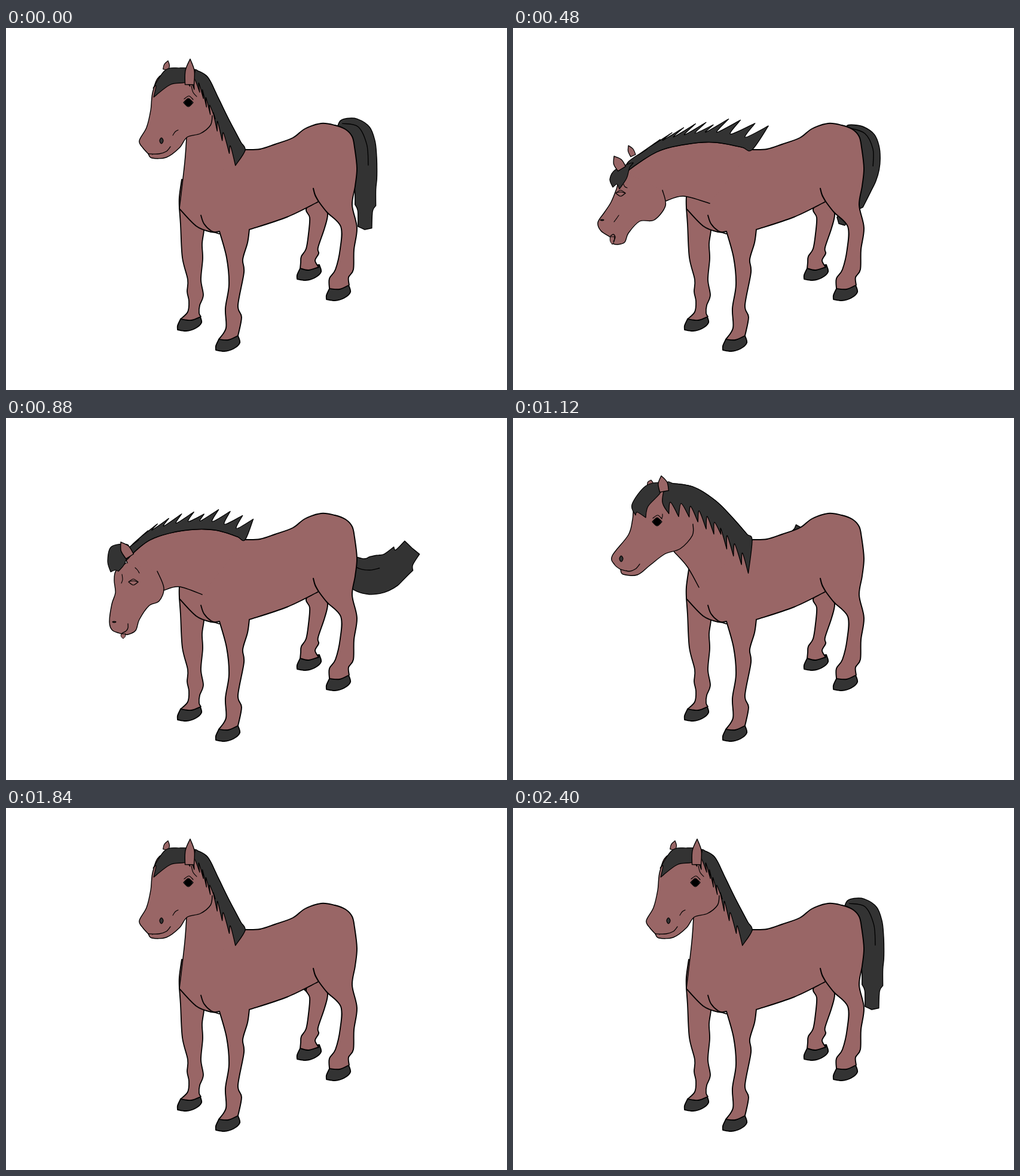
An HTML page for the animation above (2.48 s loop, 838 px wide and 607 px high).

```html
<!DOCTYPE html>
<html lang="en">
<head>
<meta charset="utf-8">
<title>Horse</title>
<style>
html, body { margin: 0; width: 100%; height: 100%; overflow: hidden; background: #fff; }
svg { display: block; width: 838px; height: 607px; }
path { stroke: #000; stroke-linejoin: round; stroke-linecap: round; }
</style>
</head>
<body>
<svg id="stage" viewBox="0 0 838 607"></svg>
<script>
const LOOP = 2480, STEP = 80;
const BROWN = '#996666', DARK = '#333333';
const stage = document.getElementById('stage');

const pt = (x, y, c = false) => ({ x, y, c });
const add = (a, b, k = 1, c = false) => pt(a.x + b.x * k, a.y + b.y * k, c);
const mix = (a, b, u) => a + (b - a) * u;
const mixPts = (a, b, u) => a.map((p, i) =>
  pt(mix(p.x, b[i].x, u), mix(p.y, b[i].y, u), p.c || b[i].c));
const rnd = i => { const v = Math.sin(i * 12.9898 + 4) * 43758.5453; return v - Math.floor(v); };

// Points are "x,y"; a trailing ! makes a sharp corner.
const parse = s => s.trim().split(/\s+/).map(p => {
  const [x, y] = p.split(',').map(parseFloat);
  return pt(x, y, p.endsWith('!'));
});

// Smooth path through the points
function curve(pts, closed) {
  const n = pts.length, r = v => v.toFixed(1);
  const at = i => closed ? pts[(i + n) % n] : pts[Math.max(0, Math.min(n - 1, i))];
  let d = `M${r(pts[0].x)} ${r(pts[0].y)}`;
  for (let i = 0; i < (closed ? n : n - 1); i++) {
    const a = at(i), b = at(i + 1);
    const p = a.c ? a : at(i - 1), q = b.c ? b : at(i + 2);
    d += `C${r(a.x + (b.x - p.x) / 6)} ${r(a.y + (b.y - p.y) / 6)} ` +
         `${r(b.x - (q.x - a.x) / 6)} ${r(b.y - (q.y - a.y) / 6)} ${r(b.x)} ${r(b.y)}`;
  }
  return closed ? d + 'Z' : d;
}

// Position at s (0..1) on the smooth line through the points
function along(pts, s) {
  const m = pts.length - 1, f = Math.max(0, Math.min(1, s)) * m;
  const i = Math.min(m - 1, Math.floor(f)), u = f - i;
  const [a, b, c, d] = [-1, 0, 1, 2].map(k => pts[Math.max(0, Math.min(m, i + k))]);
  const v = k => b[k] + u / 2 * (c[k] - a[k] +
    u * (2 * a[k] - 5 * b[k] + 4 * c[k] - d[k] + u * (3 * (b[k] - c[k]) + d[k] - a[k])));
  return pt(v('x'), v('y'));
}

function direction(a, b) {
  const len = Math.hypot(b.x - a.x, b.y - a.y) || 1;
  return pt((b.x - a.x) / len, (b.y - a.y) / len);
}

function addPath(fill, width) {
  const el = document.createElementNS('http://www.w3.org/2000/svg', 'path');
  el.setAttribute('fill', fill);
  el.setAttribute('stroke-width', width);
  return stage.appendChild(el);
}

const still = (fill, width, closed, pts) =>
  addPath(fill, width).setAttribute('d', curve(pts, closed));

const parts = {};
function part(name, fill, width, closed) {
  parts[name] = { el: addPath(fill, width), closed };
}
const show = (name, pts) => parts[name].el.setAttribute('d', curve(pts, parts[name].closed));

// Tail: a bending spine with a half-width
const tail = (width, spine) => ({ width, spine: parse(spine) });
const rest = tail(21, '557,162 592,176 600,235 601,288 600,338');
const tuck = tail(16, '557,168 592,186 597,235 578,285 545,328');
const swish = [
  [0, tuck],
  [80, tail(18, '557,168 603,188 616,245 600,310 572,354')],
  [160, tail(28, '557,170 598,200 640,235 654,275 614,318')],
  [320, tail(26, '557,174 610,202 655,212 690,209 722,199')],
  [400, tail(32, '560,240 595,263 630,260 658,242 679,218')],
  [480, tail(13, '560,195 562,220 550,250 529,277 499,305')],
  [640, tail(10, '560,195 545,207 525,207 498,197 471,185')],
  [880, tuck]
];

// Head: a few key points for each pose
const heads = {
  up: {
    crest: '316,70! 337,82 354,115 372,152 400,205!',
    throat: '300,140! 302,183! 299,225 290,303',
    head: '318,74 262,78 246,105 242,138 235,167 223,189 229,201 238,211! 244,218 268,217 290,201 303,183 325,177 342,163 345,147',
    lock: '316,70 290,67 266,71 246,101! 251,97 247,116! 275,95 303,90',
    ears: '307,95 308,52 267,70 271,55',
    face: '305,125 260,189',
    mouth: '238,211 256,211 268,207 275,199',
    marks: '310,97 313,108 319,115 279,180 283,174 288,171',
    tongue: '245,212 245,212',
    hair: '-17,7 -12,27', open: 1
  },
  down: {
    crest: '188,242! 240,208 290,195 340,192 400,204!',
    throat: '190,275! 256,290! 285,282 329,294',
    head: '190,243 178,254 173,270 164,292 153,309 142,326 147,340 162,350! 168,362 186,360 193,344 212,324 236,322 255,298 250,272',
    lock: '200,226 172,237 162,253 167,267! 174,262 178,270! 190,252 195,234',
    ears: '182,236 169,215 201,214 193,197',
    face: '180,277 149,322',
    mouth: '163,349 168,346 171,351 168,358',
    marks: '185,262 187,266 191,268 169,325 172,321 177,314',
    tongue: '166,350 166,363',
    hair: '4,-17 29,-34', open: 0
  },
  low: {
    crest: '201,238! 240,205 295,189 350,188 400,204!',
    throat: '215,275! 264,289! 290,283 328,296',
    head: '201,243 184,256 181,272 183,293 177,312 173,342 178,356 194,362! 204,363 217,356 223,338 239,315 256,307 264,285 253,257',
    lock: '203,212 176,216 170,240 175,258! 183,255 188,257! 198,245 204,225',
    ears: '207,232 192,208 203,224 198,214',
    face: '213,275 181,342',
    mouth: '194,361 201,357 204,352 204,345',
    marks: '216,251 220,255 223,260 194,262 195,271 193,277',
    tongue: '196,362 196,370',
    hair: '-2,-14 16,-29', open: 0
  },
  mid: {
    crest: '257,109! 300,115 338,138 368,168 400,205!',
    throat: '245,185! 270,225! 292,250 311,284',
    head: '262,110 222,118 203,150 200,170 193,196 166,231 170,246 180,254! 184,262 208,263 229,247 254,228 280,219 300,197 301,178',
    lock: '250,109 222,114 199,145 205,163! 208,158 222,167! 226,148 246,126',
    ears: '253,123 248,97 229,113 231,104',
    face: '241,174 181,236',
    mouth: '180,254 194,257 205,253 212,245',
    marks: '250,161 250,165 249,168 181,235 181,236 182,236',
    tongue: '190,256 190,256',
    hair: '-8,31 -3,52', open: 1
  }
};
for (const h of Object.values(heads))
  for (const k in h) if (k !== 'open') h[k] = parse(h[k]);

const nod = [[0, heads.up], [480, heads.down], [560, heads.down], [880, heads.low],
  [1120, heads.mid], [1360, heads.up], [LOOP, heads.up]];

part('tail', DARK, 1.4, true);
part('strand', 'none', 1.4, false);

// Hooves share one shape; the legs cover their tops.
const hoof = parse('0,0! 32,-6! 35,6 24,16 9,20 -5,18! -5,11');
const hoofAt = (x, y) => still(DARK, 1.8, true, hoof.map(p => pt(p.x + x, p.y + y, p.c)));

hoofAt(492, 403);
hoofAt(292, 488);
still(BROWN, 1.9, false, parse('515,285 502,304 508,318 506,345 502,370 494,383 493,393 492,403! 506,406 523,401! 517,390 523,378 522,368 533,335 538,311 530,290'));
still(BROWN, 1.8, false, parse('290,303 292,330 295,385 304,422 303,442 306,458 304,476 292,488! 310,490 326,484! 323,478 324,465 330,448 326,422 329,387 328,362 331,340 331,325'));

hoofAt(356, 522);
hoofAt(541, 437);
still(BROWN, 1.9, false, parse(`400,204 425,203 450,195 480,184 500,169 527,160 550,163 568,170 579,182 583,200
  587,235 584,265 579,297 587,335 582,372 581,405 573,418 574,431! 558,438 541,437! 541,420 551,405
  559,370 560,333 537,309 523,291! 470,317 407,338! 404,360 396,388 398,410
  388,465 394,485 388,516! 372,523 356,522! 368,503 367,470 373,430 369,385
  357,341! 343,342 318,332 290,303! 290,283 294,254`));
still('none', 2, false, parse('514,269 517,280 523,291'));
still('none', 1.8, false, parse('326,314 331,328 343,340 357,345'));

part('neck', BROWN, 1.5, false);
part('farEar', BROWN, 1.2, true);
part('head', BROWN, 1.4, false);
part('mane', DARK, 1.3, true);
part('lock', DARK, 1.2, true);
part('ear', BROWN, 1.4, true);
part('eye', '#fff', 1.2, true);
part('pupil', '#000', 0.6, true);
part('lid', 'none', 1.2, false);
part('crease', 'none', 1.1, false);
part('cheek', 'none', 1.1, false);
part('nostril', DARK, 1.2, true);
part('tongue', BROWN, 1, true);
part('mouth', 'none', 1.3, false);

function span(keys, t) {
  let i = 0;
  while (i < keys.length - 2 && t >= keys[i + 1][0]) i++;
  const [t0, a] = keys[i], [t1, b] = keys[i + 1];
  return { a, b, u: (t - t0) / (t1 - t0) };
}

// A leaf from base to tip
function leaf(base, tip, half) {
  const d = direction(base, tip), n = pt(-d.y, d.x), m = mixPts([base], [tip], 0.55)[0];
  return [add(base, n, -half, true), add(m, n, -half), pt(tip.x, tip.y, true),
    add(m, n, half), add(base, n, half, true)];
}

const oval = (c, rx, ry, sharp) =>
  [pt(c.x - rx, c.y, sharp), pt(c.x, c.y - ry), pt(c.x + rx, c.y, sharp), pt(c.x, c.y + ry)];

function drawTail(t) {
  let k = { a: rest, b: rest, u: 0 };
  if (t < 480) k = { a: rest, b: tuck, u: t / 480 };
  else if (t < 2400) k = span(swish, (t - 480) % 880);
  const spine = mixPts(k.a.spine, k.b.spine, k.u), width = mix(k.a.width, k.b.width, k.u);
  const edge = (s, side, out = 0, c = false) => {
    const d = direction(along(spine, s - 0.02), along(spine, s + 0.02));
    const half = width * (0.3 + 0.7 * Math.sin(Math.PI * s ** 0.8)) + out / 4;
    return add(add(along(spine, s), d, out), pt(d.y, -d.x), half * side, c);
  };
  const left = [], right = [], n = 12;
  for (let i = 0; i < n; i++) {
    const s = i / n, tuft = i > 7 && i % 2;
    left.push(edge(s, 1, tuft ? 10 : 0, !!tuft));
    right.unshift(edge(s, -1, tuft ? 8 : 0, !!tuft));
  }
  const end = spine[spine.length - 1];
  show('tail', [...left, pt(end.x, end.y, true), ...right]);
  show('strand', [0.05, 0.2, 0.35, 0.48].map(s => edge(s, 0.3)));
}

// Tufts grow along the crest, each with a tip and a valley.
function drawMane(crest, [valley, tip]) {
  const n = 11, pts = [];
  for (let i = 0; i <= 12; i++) pts.push(along(crest, i / 12));
  for (let i = n - 1; i >= 0; i--) {
    const s = (i + 0.6) / n;
    pts.push(add(along(crest, s), tip, 0.85 + 0.3 * rnd(i), true));
    pts.push(add(along(crest, s - 0.5 / n), valley));
  }
  show('mane', pts);
}

function drawHead(t) {
  const { a, b, u } = span(nod, t);
  const e = u * u * (3 - 2 * u);
  // The head swings out in an arc on its way down.
  const arc = a === heads.up && b === heads.down ? 36 * Math.sin(Math.PI * u) : 0;
  const p = {};
  for (const k in a) {
    if (k === 'open') continue;
    p[k] = mixPts(a[k], b[k], e);
    if (k !== 'hair') p[k] = p[k].map(q =>
      add(q, pt(-arc, -arc), Math.max(0, Math.min(1, (330 - q.x) / 100)), q.c));
  }
  show('neck', [...p.crest].reverse().concat(p.throat));
  for (const k of ['head', 'lock', 'mouth']) show(k, p[k]);
  drawMane(p.crest, p.hair);
  show('ear', leaf(p.ears[0], p.ears[1], 7.5));
  show('farEar', leaf(p.ears[2], p.ears[3], 4.5));
  show('tongue', leaf(p.tongue[0], p.tongue[1], 3.5));
  show('crease', p.marks.slice(0, 3));
  show('cheek', p.marks.slice(3));

  const [eye, nostril] = p.face, open = mix(a.open, b.open, e);
  show('eye', oval(eye, 8, 5 + 2 * open, true));
  show('pupil', oval(eye, 6.5, 6.5));
  show('lid', [add(eye, pt(-7, -1 - 5 * open)), add(eye, pt(1, -2 - 9 * open)), add(eye, pt(8, -5 * open))]);
  show('nostril', oval(nostril, 3, 1 + 4 * open));
  parts.eye.el.setAttribute('fill', open > 0.5 ? '#fff' : BROWN);
  parts.pupil.el.setAttribute('visibility', open > 0.5 ? 'visible' : 'hidden');
}

function draw(ms) {
  const t = Math.floor((ms % LOOP) / STEP) * STEP;
  drawTail(t);
  drawHead(t);
}

const start = performance.now();
function tick() {
  draw(performance.now() - start);
  requestAnimationFrame(tick);
}
draw(0);
requestAnimationFrame(tick);
</script>
</body>
</html>
```
